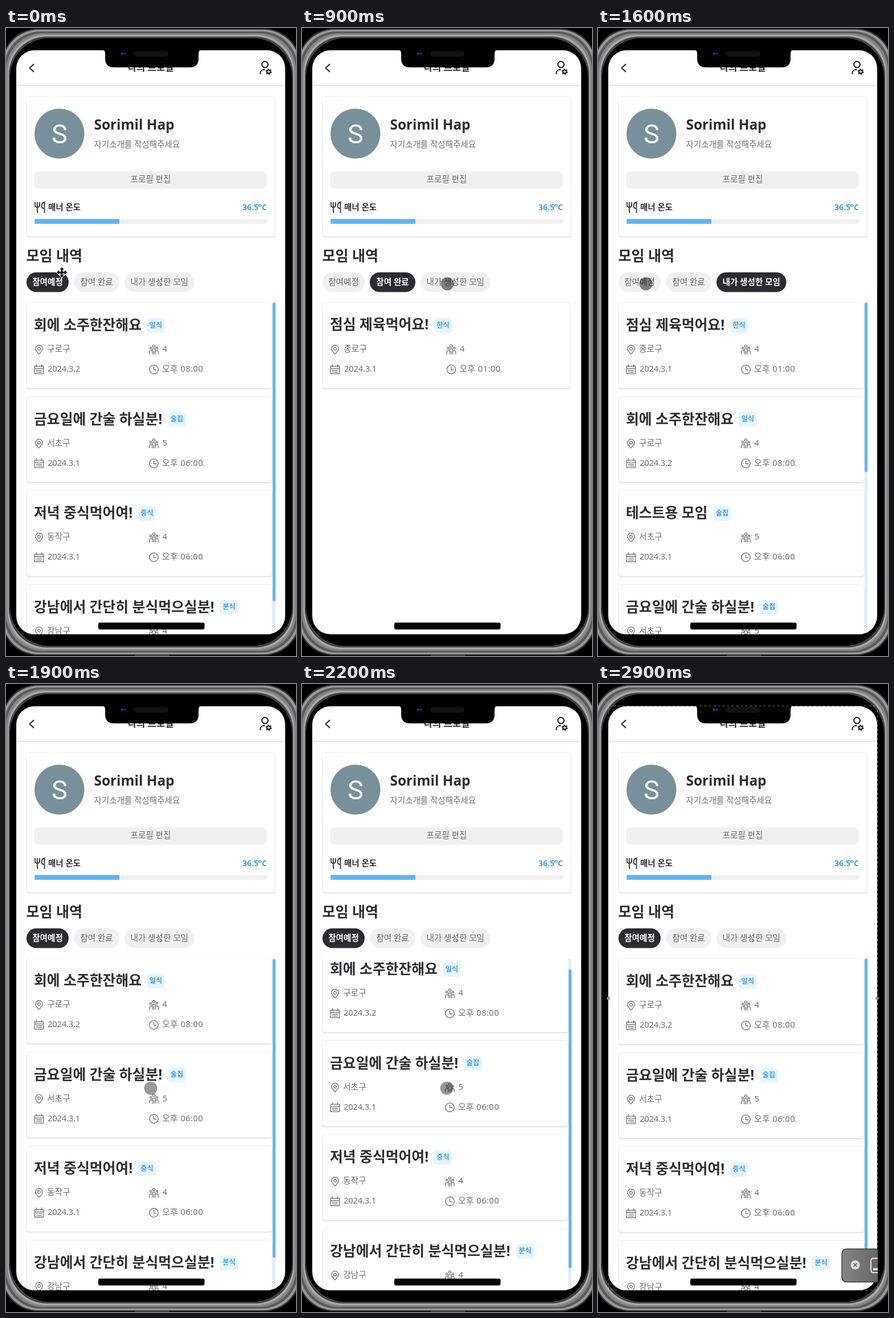
An HTML page that plays this animation: 509x1100 px, repeating every 3410 ms.

```html
<!DOCTYPE html>
<html lang="ko">
<head>
<meta charset="utf-8">
<style>
  html, body { margin: 0; width: 100%; height: 100%; overflow: hidden; background: #000; }
  svg { display: block; width: 509px; height: 1100px; }
  text { font-family: "Noto Sans", "Noto Sans CJK KR", "Noto Sans CJK", sans-serif; white-space: pre; }
</style>
</head>
<body>
<svg id="stage" viewBox="0 0 509 1100"></svg>
<script>
const LOOP = 3410, STEP = 100;
const INK = '#2b2b33', MUTED = '#6b6b73', BLUE = '#3a9fe2', BAR = '#63b4f2', PALE = '#f0f0f2';
const LIST = { top: 481, height: 581, pitch: 164.6 };
const stage = document.getElementById('stage');

const rect = (x, y, w, h, r, fill, extra = '') =>
  `<rect x="${x}" y="${y}" width="${w}" height="${h}" rx="${r}" fill="${fill}" ${extra}/>`;
const text = (x, y, size, fill, body, weight = 400, extra = '') =>
  `<text x="${x}" y="${y}" font-size="${size}" fill="${fill}" font-weight="${weight}" ${extra}>${body}</text>`;
const middle = 'text-anchor="middle"';
const panel = (x, y, w, h) =>
  rect(x - .5, y + 1, w + 1, h + 1, 5, '#e3e3e6') +
  rect(x, y, w, h, 5, '#fff', 'stroke="#ececef"');

const ICONS = {
  pin: '<path d="M0 8C-4 4-6.2 1.5-6.2-1.3a6.2 6.2 0 0 1 12.4 0C6.2 1.5 4 4 0 8Z"/><circle cy="-1.3" r="2.4"/>',
  date: '<path d="M-7.7-5.5h15.4v13h-15.4ZM-7.7-1.5h15.4M-4.5-8.5v4M4.5-8.5v4M-4.5 1.7h2M-1 1.7h5.5M-4.5 4.6h2M-1 4.6h5.5"/>',
  people: '<circle cy="-5.8" r="2.1"/><circle cx="-5.3" cy="-2.3" r="1.7"/><circle cx="5.3" cy="-2.3" r="1.7"/>' +
    '<path d="M-2.6 8V1.2a2.6 2.6 0 0 1 5.2 0V8M-7.7 8V4.2a2.3 2.3 0 0 1 4-1.5M7.7 8V4.2a2.3 2.3 0 0 0-4-1.5M0 3v5"/>',
  clock: '<circle r="7.7"/><path d="M0-4.5V.7H4"/>'
};
const icon = (name, x, y) =>
  `<g transform="translate(${x} ${y})" fill="none" stroke="#74747c" stroke-width="1.35" stroke-linecap="round">${ICONS[name]}</g>`;

// title, badge, badge x, district, head count, date, hour
const MEALS = {
  fish:   ['회에 소주한잔해요', '일식', 247.5, '구로구', 4, '2024.3.2', '08:00'],
  drinks: ['금요일에 간술 하실분!', '술집', 284.5, '서초구', 5, '2024.3.1', '06:00'],
  dinner: ['저녁 중식먹어여!', '중식', 232, '동작구', 4, '2024.3.1', '06:00'],
  snack:  ['강남에서 간단히 분식먹으실분!', '분식', 376, '강남구', 4, '2024.3.1', '07:00'],
  lunch:  ['점심 제육먹어요!', '한식', 232, '종로구', 4, '2024.3.1', '01:00'],
  trial:  ['테스트용 모임', '술집', 202.5, '서초구', 5, '2024.3.1', '06:00']
};

function card(key, index, wide) {
  const [title, tag, tagX, place, people, date, hour] = MEALS[key];
  const shift = wide ? 1 : 0, col = 259.5 + 2.5 * shift;
  const info = (x, y, body, spacing = 0) =>
    text(x, y, 14.8, MUTED, body, 400, `letter-spacing="${spacing}"`);
  return `<g transform="translate(0 ${LIST.top + index * LIST.pitch})">` +
    panel(36, 0, wide ? 435.5 : 431, 150) +
    text(49, 48 - shift, 24.8, INK, title, 600) +
    rect(tagX, 27, 31, 26, 5, '#e6f4fe') +
    text(tagX + 15.5, 43.6, 12.2, BLUE, tag, 600, middle) +
    icon('pin', 58, 82) + info(72 + shift, 86.3, place) +
    icon('people', col, 82) + info(col + 15, 86.3, people) +
    icon('date', 58, 117) + info(73 + shift, 121.3, date, -.2) +
    icon('clock', col, 117) + info(col + 14.5, 121.3, '오후 ' + hour, .4) + '</g>';
}

const TABS = [
  { label: '참여예정', x: 36, w: 74, meals: ['fish', 'drinks', 'dinner', 'snack'], thumb: 523 },
  { label: '참여 완료', x: 119, w: 80, meals: ['lunch'], thumb: 0 },
  { label: '내가 생성한 모임', x: 208, w: 122.5, meals: ['lunch', 'fish', 'trial', 'drinks'], thumb: 297 }
];

const tabView = (tab, i) => [false, true].map(on =>
  `<g id="tab${i}${on ? 'on' : 'off'}">` + rect(tab.x, 428, tab.w, 34.5, 17.2, on ? INK : PALE) +
  text(tab.x + tab.w / 2, 450, 14.6, on ? '#fff' : MUTED, tab.label, on ? 600 : 400, middle) + '</g>').join('');

const listView = (tab, i) => `<g id="list${i}"><g id="cards${i}">` +
  tab.meals.map((m, n) => card(m, n, !tab.thumb)).join('') + '</g>' +
  (tab.thumb ? rect(468, LIST.top, 5, LIST.height, 0, '#dcf0fd') +
    rect(468, LIST.top, 5, tab.thumb, 2, BAR, `id="thumb${i}"`) : '') + '</g>';

// Nested rims; nearly constant radii make the metal thicker at the corners
function shell() {
  const rims = [[-7, 1, '#333'], [-6, 3, '#98989a'], [-3, 6, '#5a5a5c'], [0, 9, '#858587'],
    [3, 12, '#a8a8aa'], [5, 15, '#424244'], [7, 18, '#000']];
  return rect(0, 0, 509, 1100, 0, '#000') +
    rims.map(([x, y, fill], i) => rect(x, y, 509 - 2 * x, 1100 - 2 * y, 62 + i, fill)).join('') +
    rect(226, 1097, 60, 3, 1, '#444');
}

const header = rect(18, 99.5, 472, 2.5, 0, '#ececee') +
  text(254, 74.5, 16.5, INK, '나의 프로필', 600, middle) +
  '<path d="M49 63l-7.5 7 7.5 7" fill="none" stroke="#333" stroke-width="2.3"/>' +
  '<g fill="none" stroke="#1d1d20" stroke-width="2"><circle cx="454.5" cy="64" r="5.4"/>' +
  '<path d="M446.5 81v-2.5a6 6 0 0 1 6-5.5h2"/>' +
  '<circle cx="461" cy="76.5" r="3"/><circle cx="461" cy="76.5" r="4.4" stroke-dasharray="2.3 2.3"/></g>';

const profile = panel(36, 119.5, 436, 245.5) +
  '<circle cx="93.800" cy="185" r="43.800" fill="#78909c"/>' +
  `<text x="94" y="202" font-size="47" fill="#fff" ${middle} style="font-family:Roboto,sans-serif">S</text>` +
  text(154.5, 178, 24.4, INK, 'Sorimil Hap', 600) +
  text(154.5, 209, 14.5, MUTED, '자기소개를 작성해주세요') +
  rect(50, 251, 408, 30.5, 8, PALE) +
  text(254, 270, 14.5, MUTED, '프로필 편집', 400, middle) +
  '<path d="M51 305v5q0 4 4 4t4-4v-5M55 305v19M67.500 324v-19q-5 1-5 7 0 4 5 4" fill="none" stroke="#2b2b33" stroke-width="1.8"/>' +
  text(74, 318.7, 14.5, INK, '매너 온도', 600) +
  text(458, 318.7, 14, BLUE, '36.5°C', 700, 'text-anchor="end"') +
  rect(50, 334.5, 408, 8.5, 3, PALE) + rect(50, 334.5, 149, 8.5, 2, BAR);

const notch = '<path d="M168 38q6 0 6 7v8q0 16 16 16h132q16 0 16-16v-8q0-7 6-7Z"/>' +
  rect(225, 40, 60, 10, 5, '#121214') +
  '<circle cx="206" cy="45" r="6" fill="#080c18"/>' +
  '<circle cx="204" cy="45" r="2" fill="#174684"/><circle cx="208.500" cy="45" r="1.800" fill="#123768"/>' +
  rect(162, 1041.5, 186.5, 12, 3, '#000');

const arrow = [0, 90, 180, 270].map(a => `<path transform="rotate(${a})" d="M-1.2 0V-5H-3.700L0-9 3.700-5H1.200V0Z"/>`).join('');
const moveCursor = `<g id="mover" transform="translate(98 428)"><g fill="#fff" stroke="#fff" stroke-width="2">${arrow}</g>${arrow}</g>`;

const capture = '<g id="capture">' +
  '<rect x="18.500" y="38.500" width="472" height="1023" fill="none" stroke="#fff" stroke-opacity=".4" stroke-dasharray="4 4"/>' +
  '<g fill="#8a8a8a"><circle cx="18" cy="550.500" r="2.800"/><circle cx="490" cy="550.500" r="2.800"/></g>' +
  '<g clip-path="url(#edge)">' + rect(428, 989.5, 90, 58, 8, 'url(#tool)', 'stroke="#3f3f3f" stroke-width="1.5"') +
  '<circle cx="451.500" cy="1017.500" r="8" fill="#dedede"/>' +
  '<path d="M448.500 1014.500l6 6m0-6l-6 6" stroke="#686868" stroke-width="1.800"/>' +
  rect(479, 1006, 30, 25, 4, 'none', 'stroke="#e4e4e4" stroke-width="2"') +
  rect(483, 1023, 20, 4, 0, '#e4e4e4') + '</g></g>';

stage.innerHTML =
  `<defs><clipPath id="screen">${rect(18, 39, 472, 1023, 32, '#000')}</clipPath>
  <clipPath id="window">${rect(18, 480, 472, 582, 0, '#000')}</clipPath>
  <clipPath id="edge">${rect(18, 39, 473, 1023, 0, '#000')}</clipPath>
  <linearGradient id="tool"><stop stop-color="#858585"/><stop offset=".7" stop-color="#666"/></linearGradient></defs>` +
  shell() + '<g clip-path="url(#screen)">' + rect(18, 39, 472, 1023, 0, '#fff') + header + profile +
  text(35.5, 407.5, 25, INK, '모임 내역', 600) + TABS.map(tabView).join('') +
  `<g clip-path="url(#window)">${TABS.map(listView).join('')}</g></g>` + notch +
  '<circle id="touch" r="11.500"/>' + moveCursor + capture;

// Keys are [tick, ...values]
const POINTER = [[1, 98, 428], [2, 104, 432], [5, 164, 447], [7, 164, 447], [9, 255, 448],
  [10, 255, 448], [16, 84, 448], [17, 84, 448], [19, 254, 708]];
const SCROLL = [[18, 0], [19, 1], [20, 18], [21, 34], [22, 21], [23, 7], [24, 2], [25, 0]];

function sample(keys, tick) {
  const next = keys.findIndex(k => k[0] > tick);
  if (next < 0) return keys[keys.length - 1].slice(1);
  if (next === 0) return keys[0].slice(1);
  const a = keys[next - 1], b = keys[next];
  const u = (tick - a[0]) / (b[0] - a[0]), ease = u * u * (3 - 2 * u);
  return a.slice(1).map((v, i) => v + (b[i + 1] - v) * ease);
}

const el = id => document.getElementById(id);
const show = (id, on) => el(id).setAttribute('display', on ? 'inline' : 'none');

function update(time) {
  const tick = Math.floor(time / STEP);
  const active = tick < 6 || tick >= 17 ? 0 : tick < 10 ? 1 : 2;
  TABS.forEach((tab, i) => {
    show(`tab${i}on`, i === active);
    show(`tab${i}off`, i !== active);
    show(`list${i}`, i === active);
  });

  const [scroll] = sample(SCROLL, tick);
  el('cards0').setAttribute('transform', `translate(0 ${-scroll})`);
  el('thumb0').setAttribute('y', LIST.top + scroll * .9);

  const [x, y] = sample(POINTER, tick);
  const touch = el('touch');
  touch.setAttribute('cx', x);
  touch.setAttribute('cy', y);
  touch.setAttribute('fill-opacity', tick < 18 ? .48 : .4);
  show('touch', tick >= 1 && tick < 28);
  show('mover', tick < 1);
  show('capture', tick >= 28);
  el('capture').setAttribute('opacity', tick === 28 ? .6 : 1);
}

const start = performance.now();
function frame() {
  update((performance.now() - start) % LOOP);
  requestAnimationFrame(frame);
}
frame();
</script>
</body>
</html>
```
